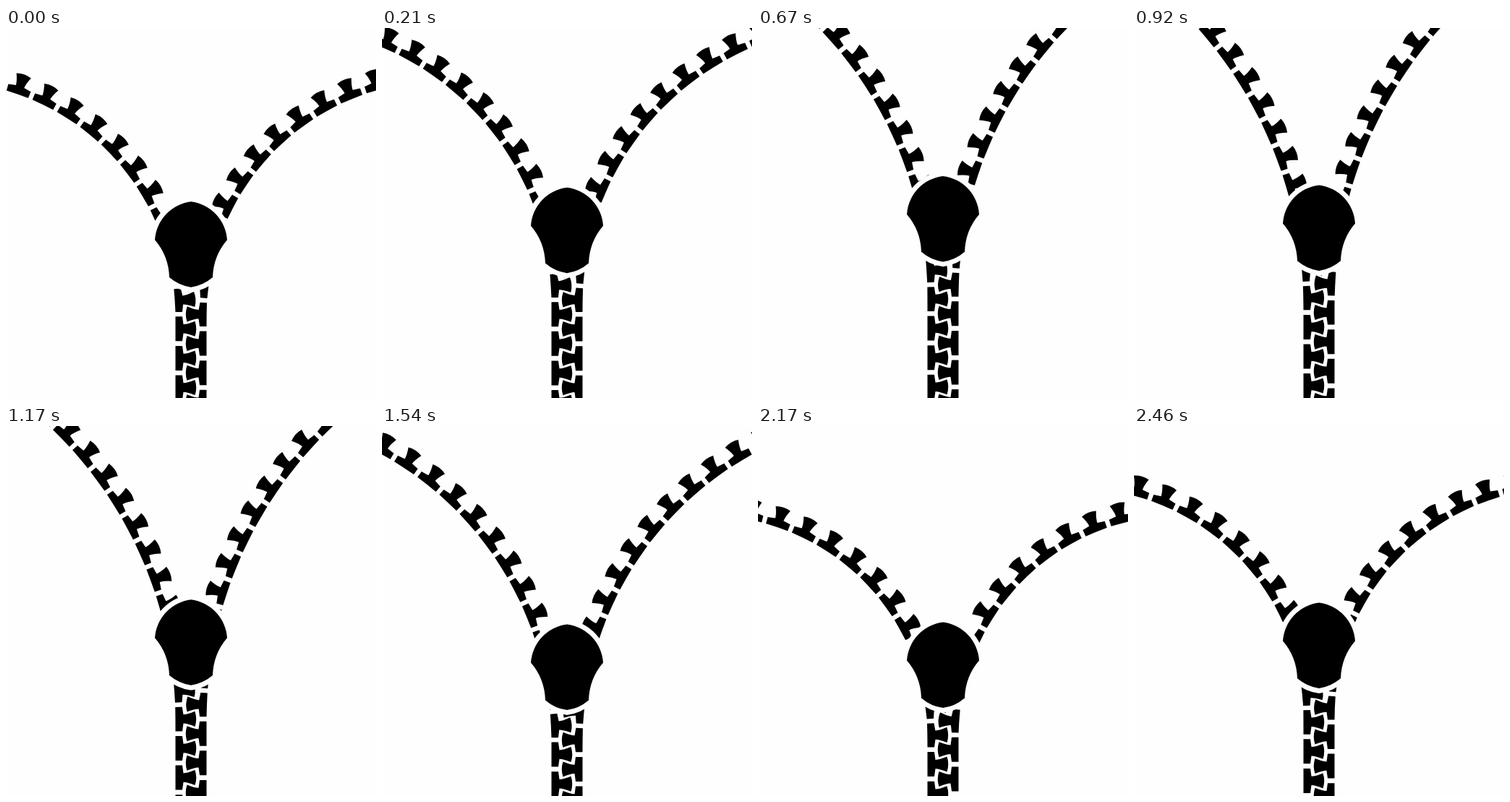
An HTML page with a canvas that plays this animation: 512 by 512 pixels, repeating every 2500 ms.

```html
<!DOCTYPE html>
<html lang="en">
<head>
<meta charset="utf-8">
<title>Zipper</title>
<style>
html, body { margin: 0; width: 100%; height: 100%; overflow: hidden; background: #fefefe; }
canvas { display: block; width: 512px; height: 512px; }
</style>
</head>
<body>
<canvas id="stage" width="512" height="512"></canvas>
<script>
const ctx = document.getElementById('stage').getContext('2d');
const LOOP = 2500, STEPS = 60, PITCH = 40.6;
const EDGE = 234.5;  // outer edge of the closed left tape
const HALF = 21.5;   // from that edge to the centre line

// step, radius of the open tape, travel of the tape
const keys = [
  [0, 325, 30.6], [11, 468, 51.2], [22, 578, -12.4], [28, 560, -61.5],
  [37, 455, -93.5], [45, 351, -90.6], [59, 317, 24]
];

const key = n => {
  const len = keys.length, turn = Math.floor(n / len);
  const [step, ...vals] = keys[n - turn * len];
  return [step + turn * STEPS, ...vals];
};

// slope of column c at key n, from its two neighbours
function slope(n, c) {
  const a = key(n - 1), b = key(n), d = key(n + 1);
  const h1 = b[0] - a[0], h2 = d[0] - b[0];
  return ((b[c] - a[c]) / h1 * h2 + (d[c] - b[c]) / h2 * h1) / (h1 + h2);
}

// periodic cubic through the keys
function sample(step, c) {
  let n = keys.length - 1;
  while (keys[n][0] > step) n--;
  const a = key(n), b = key(n + 1), h = b[0] - a[0], u = (step - a[0]) / h;
  const v = 1 - u;
  return v * v * ((1 + 2 * u) * a[c] + u * h * slope(n, c)) +
         u * u * ((3 - 2 * u) * b[c] - v * h * slope(n + 1, c));
}

// place a point of the tape: p runs down along it, h goes inward
function bend(p, h, R, y0, flip) {
  let x = EDGE + h, y = p;
  if (p < y0) {
    const a = (y0 - p) / (R + HALF);
    x = EDGE - R + (R + h) * Math.cos(a);
    y = y0 - (R + h) * Math.sin(a);
  }
  return [flip ? 512 - x : x, y];
}

function tooth(p, R, y0, flip) {
  const at = (h, v) => bend(p + v, h, R, y0, flip);
  ctx.beginPath();
  ctx.moveTo(...at(0, -17));
  ctx.lineTo(...at(9.5, -17));
  ctx.lineTo(...at(11, -6.2));
  ctx.quadraticCurveTo(...at(17, -6.4), ...at(27, -10.5));
  ctx.quadraticCurveTo(...at(30.5, 0), ...at(27, 10.5));
  ctx.quadraticCurveTo(...at(17, 6.4), ...at(11, 6.2));
  ctx.lineTo(...at(9.5, 17));
  ctx.lineTo(...at(0, 17));
  ctx.quadraticCurveTo(...at(0, 0), ...at(0, -17));
  ctx.fill();
}

const slider = new Path2D(
  'M0 0A57 57 0 0 1 50 53Q31 75 30 104.8Q17 116 0 118.5' +
  'Q-17 116 -30 104.8Q-31 75 -50 53A57 57 0 0 1 0 0Z');

function draw(step) {
  const top = 244.5 - 40.5 * Math.cos(2 * Math.PI * (step - 14) / STEPS);
  const R = sample(step, 1), travel = sample(step, 2);
  const y0 = top + 147 + R / 29;

  ctx.fillStyle = '#fefefe';
  ctx.fillRect(0, 0, 512, 512);
  ctx.fillStyle = '#000';
  for (const flip of [false, true]) {
    const start = travel + (flip ? 0 : PITCH / 2);
    const first = Math.ceil((-220 - start) / PITCH);
    for (let p = start + first * PITCH; p < 540; p += PITCH) tooth(p, R, y0, flip);
  }

  ctx.save();
  ctx.translate(256, top);
  ctx.strokeStyle = '#fefefe';
  ctx.lineWidth = 13.5;
  ctx.stroke(slider);
  ctx.fill(slider);
  ctx.restore();
}

function tick() {
  const t = performance.now() % LOOP;
  // 24 pictures a second, on a 10 ms clock
  draw(Math.floor((t - t % 10 + 5) * STEPS / LOOP) % STEPS);
  requestAnimationFrame(tick);
}
tick();
</script>
</body>
</html>
```
